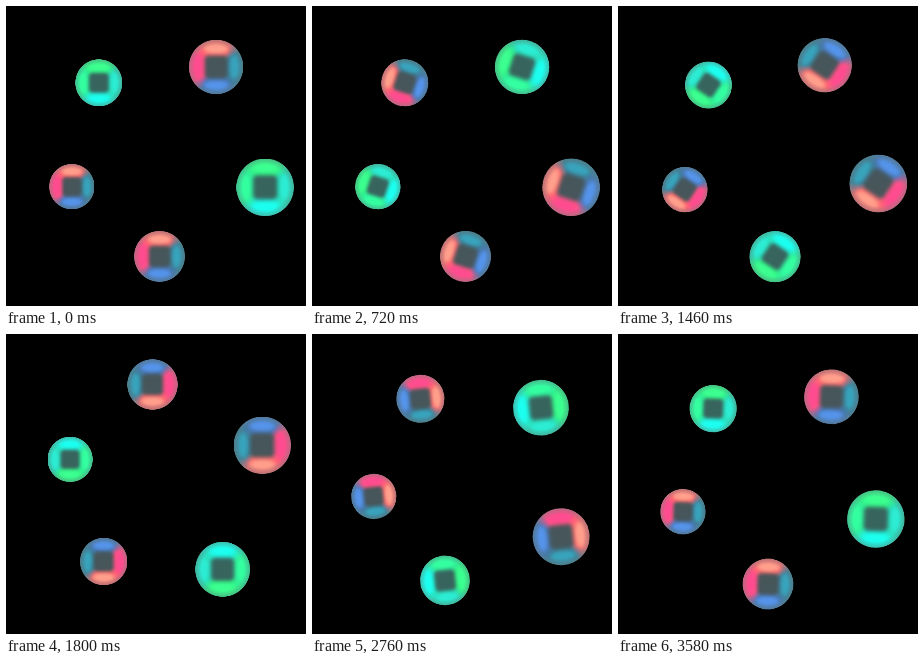
These frames come from a looping animation (300x300 px, 3600 ms). An HTML page with a canvas:

```html
<!DOCTYPE html>
<html>
<head>
<meta charset="utf-8">
<style>
html, body { margin: 0; width: 100%; height: 100%; overflow: hidden; background: #000; }
canvas { display: block; }
</style>
</head>
<body>
<canvas id="stage" width="300" height="300"></canvas>
<script>
const ctx = document.getElementById('stage').getContext('2d');
const LOOP = 3600, STEP = 20, RING = 100, RADIUS = 25.3, TILT = 0.00124;
const SPRITE = 120;

// Base and gloss colours of the four sides: right, bottom, left, top
const red = makePearl(
  ['#3f7f98', '#4a78b4', '#ff5484', '#ff6c70'],
  ['#38a4bc', '#5594ea', '#ff4c90', '#ffa08c'], '#46565a');
const green = makePearl(
  ['#2cdcb8', '#24f0d8', '#30ee9c', '#34f488'],
  ['#2cecd4', '#1cfff0', '#34ffa0', '#3cff90'], '#38645e');
const pearls = [green, red, red, green, red];

function makePearl(sides, gloss, core) {
  const canvas = document.createElement('canvas');
  canvas.width = canvas.height = SPRITE;
  const c = canvas.getContext('2d');
  c.translate(SPRITE / 2, SPRITE / 2);
  c.scale(SPRITE / 2, SPRITE / 2);
  c.arc(0, 0, 1, 0, 7);
  c.clip();

  const hues = c.createConicGradient(0, 0, 0);
  for (let i = 0; i <= 4; i++) {
    hues.addColorStop(Math.max(0, i / 4 - 0.09), sides[i % 4]);
    hues.addColorStop(Math.min(1, i / 4 + 0.09), sides[i % 4]);
  }
  c.fillStyle = hues;
  c.fillRect(-1, -1, 2, 2);

  c.filter = 'blur(4px)';
  for (const tint of gloss) {
    c.fillStyle = tint;
    c.beginPath();
    c.ellipse(0.68, 0, 0.19, 0.45, 0, 0, 7);
    c.fill();
    c.rotate(Math.PI / 2);
  }

  c.fillStyle = core;
  c.beginPath();
  c.roundRect(-0.42, -0.42, 0.84, 0.84, 0.14);
  c.fill();
  c.filter = 'none';

  const rim = c.createRadialGradient(0, 0, 0.78, 0, 0, 1);
  rim.addColorStop(0, '#60808000');
  rim.addColorStop(1, '#60808070');
  c.fillStyle = rim;
  c.fillRect(-1, -1, 2, 2);
  return canvas;
}

function draw(now) {
  const turn = -Math.floor(now % LOOP / STEP) * STEP / LOOP * 2 * Math.PI;
  ctx.fillStyle = '#000';
  ctx.fillRect(0, 0, 300, 300);
  pearls.forEach((pearl, i) => {
    const angle = turn + (16 + i * 72) * Math.PI / 180;
    const x = RING * Math.cos(angle), y = RING * Math.sin(angle);
    const scale = 1 / (1 - TILT * x);
    const r = RADIUS * scale;
    ctx.save();
    ctx.translate(150 + x * scale, 150 + y * scale);
    ctx.rotate(turn);
    ctx.drawImage(pearl, -r, -r, 2 * r, 2 * r);
    ctx.restore();
  });
}

function frame() {
  draw(performance.now());
  requestAnimationFrame(frame);
}
frame();
</script>
</body>
</html>
```
